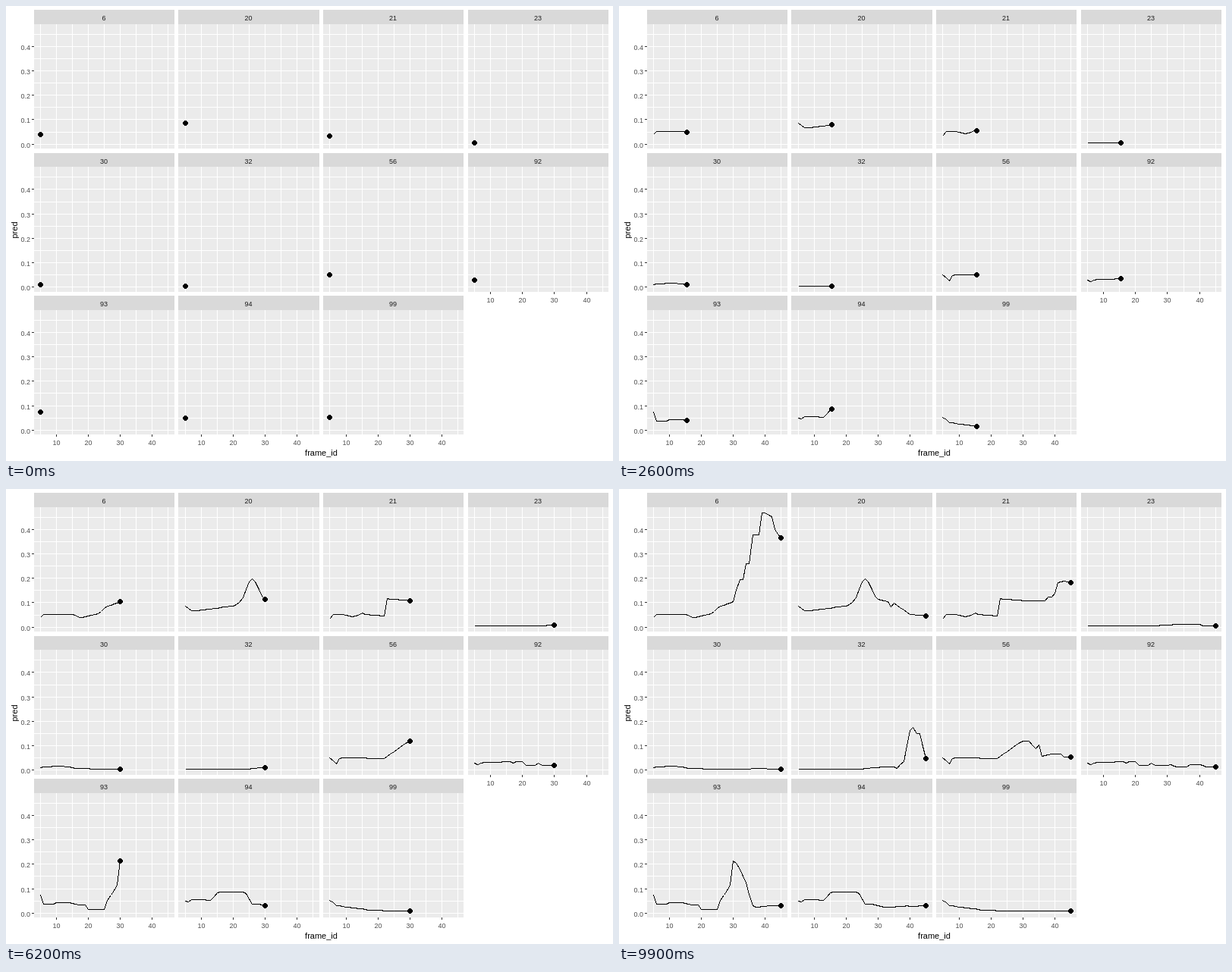
Write an HTML page that moves like this. It is 800 px wide and 600 px high and loops after 10 s.

```html
<!DOCTYPE html>
<html lang="en">
<head>
<meta charset="utf-8">
<title>pred by frame_id</title>
<style>
  html, body { margin: 0; width: 100%; height: 100%; overflow: hidden; background: #fff; }
  svg { display: block; width: 800px; height: 600px; font: 9px "Liberation Sans", Arial, sans-serif; }
  rect, line, polyline, circle { shape-rendering: crispEdges; }
  .strip { fill: #d9d9d9; }
  .panel { fill: #ebebeb; }
  .grid { stroke: #fff; }
  .tick { stroke: #333; }
  .label { fill: #4d4d4d; }
  .head { fill: #1a1a1a; }
  .title { fill: #000; font-size: 11px; }
  .mid { text-anchor: middle; }
  .end { text-anchor: end; }
  polyline { fill: none; stroke: #000; }
</style>
</head>
<body>
<svg id="stage" viewBox="0 0 800 600"></svg>
<script>
const stage = document.getElementById('stage');
const LOOP = 10000, STEP = 100, LAST = 99;
const FIRST_ID = 5, SPAN = 40;
const PITCH_X = 190.75, PITCH_Y = 188.55, UNIT = 4.21;

const xAt = (col, id) => Math.round(44.99 + col * PITCH_X + (id - FIRST_ID) * UNIT) + 0.5;
const yAt = (row, v) => Math.round(181.65 + row * PITCH_Y - v * 0.322) + 0.5;

// Step of the loop at which each frame_id is reached
const stops = Array.from({ length: SPAN + 1 }, (_, k) => Math.round(k * LAST / SPAN));

// Curve parts, in thousandths: a lasting change between two ids, and a passing hump
const ramp = (from, to, rise) => id =>
  rise * Math.min(1, Math.max(0, (id - from) / (to - from)));
const bump = (at, reach, height) => id =>
  Math.abs(id - at) < reach ? height * (1 + Math.cos(Math.PI * (id - at) / reach)) / 2 : 0;

function add(tag, attrs, text) {
  const el = document.createElementNS('http://www.w3.org/2000/svg', tag);
  for (const key in attrs) el.setAttribute(key, attrs[key]);
  if (text !== undefined) el.textContent = text;
  return stage.appendChild(el);
}

const rule = (cls, x1, y1, x2, y2) => add('line', { class: cls, x1, y1, x2, y2 });
const write = (cls, x, y, text) => add('text', { class: cls, x, y }, text);
const box = (cls, x, y, right, bottom) =>
  add('rect', { class: cls, x, y, width: right - x, height: bottom - y });

function yAxis(row) {
  for (let v = 0; v <= 400; v += 100) {
    const y = yAt(row, v);
    rule('tick', 34, y, 37, y);
    write('label end', 32, y + 4, (v / 1000).toFixed(1));
  }
}

function xAxis(col, bottom) {
  for (let id = 10; id <= 40; id += 10) {
    const x = xAt(col, id);
    rule('tick', x, bottom, x, bottom + 3);
    write('label mid', x, bottom + 14, id);
  }
}

const panels = [];

function panel(name, start, ...parts) {
  const n = panels.length, col = n % 4, row = Math.floor(n / 4);
  const left = Math.round(36.65 + col * PITCH_X), right = Math.round(221.9 + col * PITCH_X);
  const [top, mid, bottom] = [5.2, 23.6, 188.3].map(y => Math.round(y + row * PITCH_Y));

  box('strip', left, top, right, mid);
  box('panel', left, mid, right, bottom);
  for (let v = 0; v <= 450; v += 50) rule('grid', left, yAt(row, v), right, yAt(row, v));
  for (let id = 5; id <= 45; id += 5) rule('grid', xAt(col, id), mid, xAt(col, id), bottom);
  write('head mid', (left + right) / 2 - 0.5, top + 14, name);
  if (col === 0) yAxis(row);
  if (n >= 7) xAxis(col, bottom);

  panels.push({
    col, row,
    values: stops.map((_, k) => parts.reduce((sum, part) => sum + part(FIRST_ID + k), start)),
    path: add('polyline', {}),
    dot: add('circle', { r: 3.4 })
  });
}

panel('6', 39, ramp(5, 6, 13), ramp(14, 16, -3), ramp(16, 17, -11), ramp(17, 23, 17),
  ramp(23, 26, 31), ramp(26, 30, 18), ramp(30, 32, 92), ramp(33, 34, 63), ramp(35, 36, 120),
  ramp(38, 39, 88), ramp(40, 42, -16), ramp(42, 43, -53), ramp(43, 45, -32));
panel('20', 86, ramp(5, 7, -19), ramp(9, 20, 20), ramp(20, 24, 26), bump(26, 4, 85),
  ramp(30, 35, -15), bump(34, 1, -18), ramp(35, 40, -46), ramp(40, 45, -5));
panel('21', 33, ramp(5, 6, 18), ramp(9, 12, -9), ramp(12, 15, 9), bump(15, 1, 7),
  ramp(16, 22, -5), ramp(22, 23, 70), ramp(23, 31, -8), ramp(37, 38, 15), ramp(39, 40, 15),
  ramp(40, 41, 44), bump(43, 2, 5));
panel('23', 6, bump(15, 2, -2), ramp(26, 35, 6), ramp(40, 41, -6));
panel('30', 10, ramp(5, 9, 6), ramp(12, 16, -8), ramp(16, 22, -4), bump(38, 5, 3));
panel('32', 4, ramp(24, 32, 9), ramp(35, 36, -5), ramp(36, 38, 28), ramp(38, 40, 127),
  ramp(40, 41, 13), ramp(41, 42, -27), ramp(43, 45, -102));
panel('56', 51, ramp(5, 7, -25), ramp(7, 8, 22), ramp(8, 10, 3), ramp(16, 17, -3),
  ramp(22, 30, 72), ramp(32, 34, -33), ramp(34, 35, 15), ramp(35, 36, -44), ramp(36, 39, 8),
  ramp(42, 43, -12));
panel('92', 29, bump(6, 1, -8), ramp(6, 16, 6), bump(17, 1, -5), ramp(20, 21, -15),
  bump(25, 1, 8), ramp(29, 33, -6), bump(31, 1, 5), ramp(36, 37, 8), ramp(40, 42, -8));
panel('93', 74, ramp(5, 6, -37), ramp(9, 10, 7), ramp(14, 17, -10), ramp(19, 20, -18),
  ramp(25, 26, 37), ramp(26, 29, 60), ramp(29, 30, 99), ramp(30, 31, -7), ramp(31, 34, -80),
  ramp(34, 36, -94), ramp(36, 37, -7), ramp(37, 42, 7));
panel('94', 50, ramp(5, 7, 5), bump(6, 1, -7), ramp(11, 13, -3), ramp(13, 15.3, 35),
  ramp(23, 24, -6), ramp(24, 26, -45), ramp(28, 32, -13), ramp(34, 39, 7), bump(41, 2, -4));
panel('99', 53, ramp(5, 7, -22), ramp(7, 18, -20), ramp(18, 34, -4));

write('title mid', 415.5, 593, 'frame_id');
add('text', { class: 'title mid', transform: 'translate(15 295.5) rotate(-90)' }, 'pred');

let shown = -1;

function draw(step) {
  let k = 0;
  while (k < SPAN && stops[k + 1] <= step) k++;
  const part = k < SPAN ? (step - stops[k]) / (stops[k + 1] - stops[k]) : 0;

  for (const { col, row, values, path, dot } of panels) {
    const now = part ? values[k] + (values[k + 1] - values[k]) * part : values[k];
    const x = xAt(col, FIRST_ID + k + part), y = yAt(row, now);
    const trail = values.slice(0, k + 1).map((v, i) => `${xAt(col, FIRST_ID + i)},${yAt(row, v)}`);
    path.setAttribute('points', [...trail, `${x},${y}`].join(' '));
    dot.setAttribute('cx', x);
    dot.setAttribute('cy', y);
  }
}

function tick() {
  const step = Math.floor(performance.now() % LOOP / STEP);
  if (step !== shown) draw(shown = step);
  requestAnimationFrame(tick);
}
tick();
</script>
</body>
</html>
```
